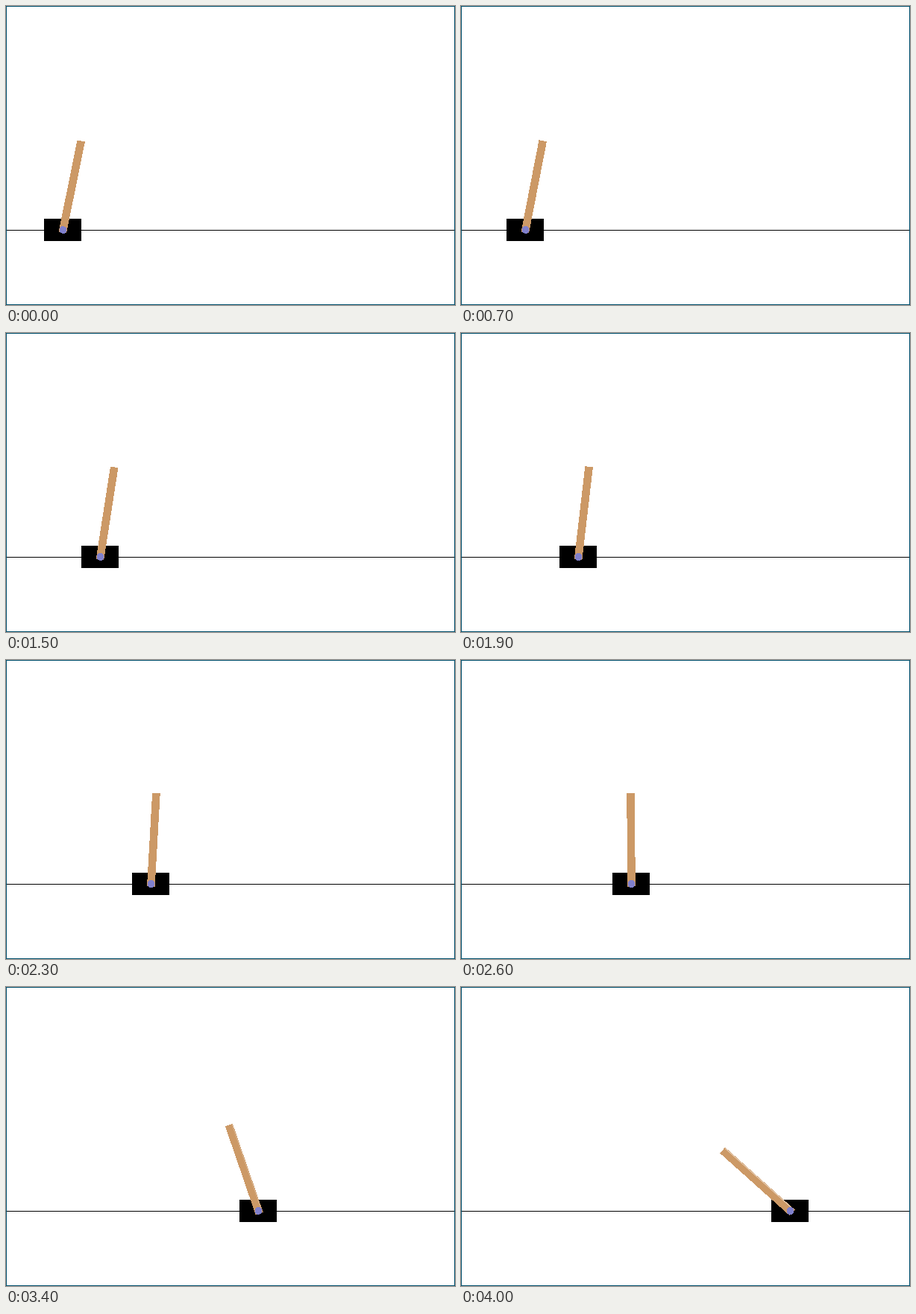
These frames come from a looping animation (602x402 px, 4100 ms). An HTML page:

```html
<!DOCTYPE html>
<html lang="en">
<head>
<meta charset="utf-8">
<title>Cart and pole</title>
<style>
  html, body { margin: 0; width: 100%; height: 100%; overflow: hidden; background: #fff; }
  svg { display: block; width: 602px; height: 402px; }
</style>
</head>
<body>
<svg viewBox="0 0 602 402" shape-rendering="crispEdges">
  <rect x="0.5" y="0.5" width="601" height="401" fill="#fff" stroke="#00506e"/>
  <rect x="1" y="301" width="600" height="1"/>
  <rect id="cart" y="286" width="50" height="30"/>
  <g id="pole">
    <rect x="-5.3" y="-122" width="10.6" height="125.5" fill="#cc9966"/>
    <rect id="gap" x="3.9" y="-121" width="0.7" height="118" fill="#fff" shape-rendering="auto"/>
    <circle r="5" fill="#8080cc"/>
  </g>
</svg>
<script>
const LOOP = 4100, STEP = 100;
const [cart, pole, gap] = ["cart", "pole", "gap"].map(id => document.getElementById(id));

// Cart under a nearly constant push, in whole pixels.
const cartX = n => Math.floor(76.04 + (0.2231 + 3.3e-6 * n * n) * n * n);

// Inverted pendulum falling away from its balance point, in radians.
const tilt = n => 0.2 - 0.0284 * (Math.cosh(0.108 * n) - 1);

function draw(ms) {
  const n = Math.floor((ms % LOOP) / STEP);
  const x = cartX(n), a = tilt(n);
  cart.setAttribute("x", x - 25);
  pole.setAttribute("transform", `translate(${x + 0.5} 301) rotate(${a * 180 / Math.PI})`);
  gap.setAttribute("opacity", Math.min(0.8, Math.max(0, (-a - 0.15) * 2)));
}

let start;
function tick(now) {
  start ??= now;
  draw(now - start);
  requestAnimationFrame(tick);
}
draw(0);
requestAnimationFrame(tick);
</script>
</body>
</html>
```
